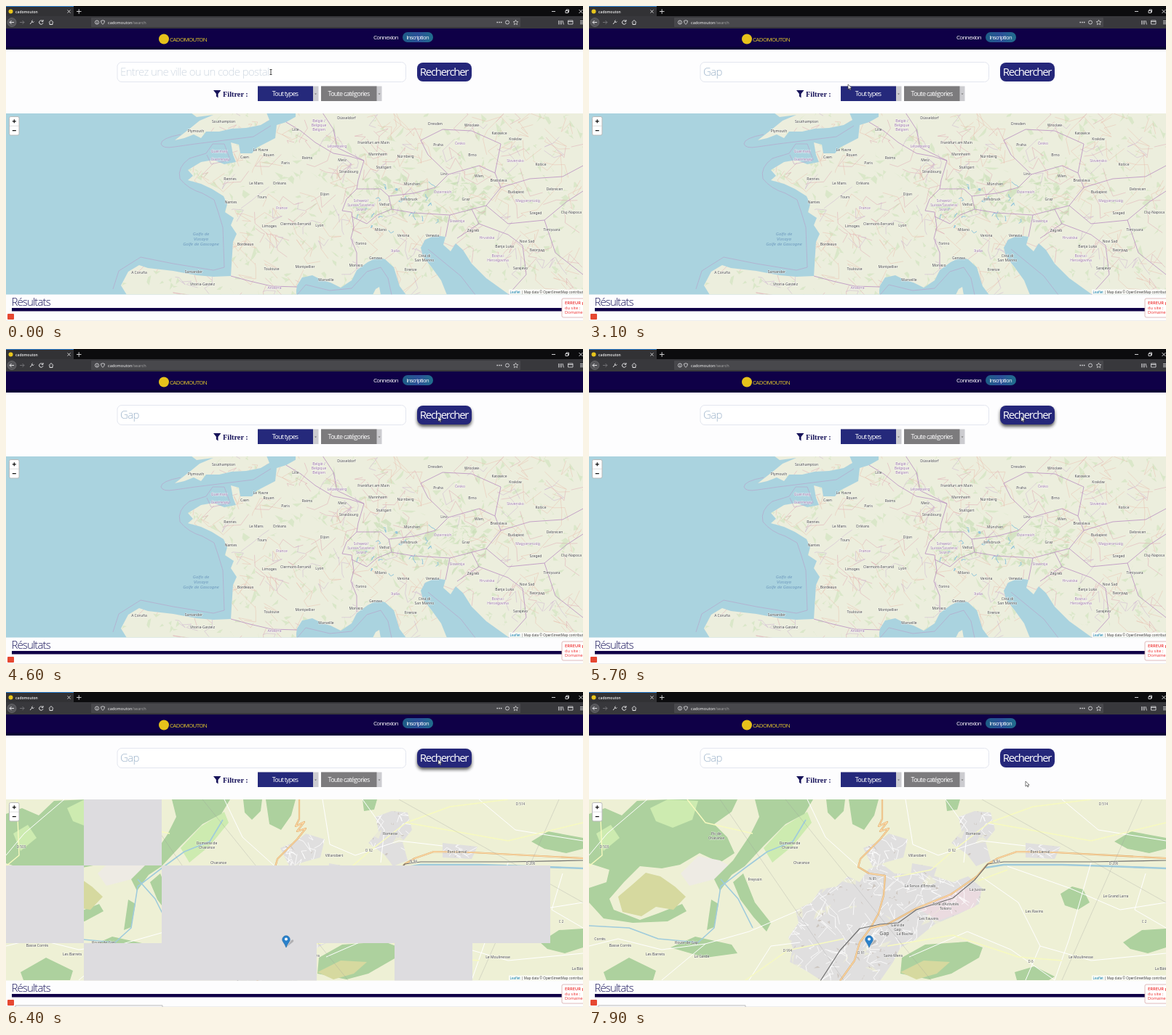
An HTML page that plays this animation: 793x434 px, repeating every 8 s.

```html
<!DOCTYPE html>
<html lang="fr">
<head>
<meta charset="utf-8">
<style>
html, body { margin: 0; width: 100%; height: 100%; overflow: hidden; background: #fff; }
svg { display: block; width: 100vw; height: 100vh; }
text { font-family: "Open Sans", sans-serif; white-space: pre; }
.ui { letter-spacing: -.085em; }
.light { font-weight: 300; letter-spacing: -.06em; }
.mid { text-anchor: middle; }
.line { fill: none; stroke: #e4e4e6; stroke-width: 1; }
.map text { font: 5px "Noto Sans", sans-serif; text-anchor: middle; fill: #444; paint-order: stroke; stroke: #fffb; stroke-width: .9px; }
.map .country { fill: #9a72a8; }
.map .sea { font: italic 6px "Noto Sans", sans-serif; fill: #6d98bd; stroke: none; }
.map .sign { font-size: 4.6px; fill: #555; }
.map path { fill: none; stroke-linejoin: round; }
.map .land { fill: #eceedd; }
.border { stroke: #b98fc0; stroke-width: .8; }
.map .wood { fill: #add19e; }
.map .grass { fill: #cdebb0; }
.map .heath { fill: #d6d99f; }
.map .rock { fill: #eeebe4; }
.map .built { fill: #e0dfdf; }
.map .works { fill: #ebdbe0; }
.lane { stroke: #fff; stroke-width: 1; }
.minor { stroke: #f7fabf; stroke-width: 1.4; }
.casing { stroke: #d2a05c; stroke-width: 2.2; }
.main { stroke: #fcd6a4; stroke-width: 1.4; }
.river { stroke: #9fcbdc; stroke-width: 1.6; }
.rail { stroke: #707070; stroke-width: 1.2; }
.power { stroke: #999; stroke-width: .3; }
</style>
</head>
<body>
<svg viewBox="0 0 793 434" preserveAspectRatio="none">
  <defs>
    <clipPath id="view"><rect y="148" width="793" height="249.500"/></clipPath>
    <clipPath id="coast"><use href="#britain"/><use href="#west"/><use href="#east"/></clipPath>
    <clipPath id="streets"><use href="#city"/><use href="#village"/><use href="#hamlet"/></clipPath>
    <linearGradient id="pill"><stop stop-color="#1d5f86"/><stop offset=".5" stop-color="#2b4f98"/><stop offset="1" stop-color="#1f6f8c"/></linearGradient>
    <filter id="blur" x="-20%" y="-40%" width="140%" height="200%"><feGaussianBlur stdDeviation="2"/></filter>
  </defs>
  <rect width="793" height="434" fill="#fdfdfe"/>

  <!-- browser -->
  <rect width="793" height="15" fill="#0c0c0e"/>
  <rect width="93" height="15" fill="#323235"/>
  <rect width="93" height="1" fill="#2f86d8"/>
  <rect y="14" width="793" height="17" fill="#38383c"/>
  <rect x="117" y="16" width="590" height="13" rx="1" fill="#48484c"/>
  <circle cx="6.500" cy="7.500" r="3" fill="#e8c51c"/>
  <text x="13" y="9.500" font-size="5" font-weight="600" fill="#eee">cadomouton</text>
  <text x="140" y="24.600" font-size="5.600" fill="#fff">cadomouton<tspan fill="#aaa">/search</tspan></text>
  <circle cx="8" cy="22.500" r="6" fill="#555559" stroke="#77777b" stroke-width=".6"/>
  <g class="line">
    <path d="M84.500 5.500l4 4m0-4l-4 4M97 7.500h6.500M100.200 4.300v6.500M750 7.500h5M787.500 5l5 5m0-5l-5 5M769 6.500h3.500v3h-3.500zM770 6v-1h3.500v3.500h-1" stroke-width=".9"/>
    <path d="M11 22.500H5m2.500-2.500l-2.500 2.500 2.500 2.500M33 25l3.500-4m0-1.500a1.500 1.500 0 1 0 2 2M50.500 21a2.700 2.700 0 1 0 .4 2.200M51 19v2.300h-2.300M59 22.500l3-3 3 3M60 22.500v3h4v-3"/>
    <path d="M19 22.500h6m-2.500-2.500l2.500 2.500-2.500 2.500" stroke="#707074"/>
    <circle cx="125" cy="22.500" r="2.600" stroke-width=".8"/><path d="M125 22v2.200M125 20.700v.6" stroke-width=".8"/>
    <path d="M130.500 20.500l2.500-.8 2.500.8q0 3.500-2.500 4.800-2.500-1.300-2.500-4.800z" stroke-width=".8"/>
    <path d="M674.500 22.500h7" stroke-width="1.500" stroke-dasharray="1.500 1.200"/>
    <circle cx="689" cy="22.500" r="2.500" stroke-width=".8"/>
    <path d="M700.500 19.200l1 2.200 2.300.3-1.700 1.600.5 2.400-2.100-1.200-2.100 1.200.5-2.400-1.700-1.600 2.300-.3z" stroke-width=".7"/>
    <path d="M759.500 20v5.500M761.500 20v5.500M763.500 20v5.500M765 20l1.500 5.500M772.500 20h6.500v5h-6.500zM772.500 21.500h6.500M789 20.500h5m-5 2h5m-5 2h5" stroke-width=".8"/>
  </g>

  <!-- page header -->
  <rect y="31" width="793" height="29" fill="#0f0047"/>
  <rect y="56" width="793" height="4" fill="#080036"/>
  <circle cx="217" cy="45.500" r="7" fill="#e6c21b"/>
  <text class="ui" x="225" y="48.500" font-size="8" fill="#e3c92c">CADOMOUTON</text>
  <text class="ui" x="505" y="45.500" font-size="8" fill="#fff">Connexion</text>
  <rect x="545" y="36" width="42" height="14" rx="7" fill="url(#pill)"/>
  <text class="ui mid" x="565.700" y="45.500" font-size="7.700" fill="#fff">Inscription</text>

  <!-- search form -->
  <rect x="153" y="77.500" width="396.500" height="27" rx="6" fill="#fff" stroke="#e3e6ef"/>
  <text id="query" class="light" x="157" y="96" font-size="15" style="letter-spacing:-.043em"></text>
  <rect id="shadow" x="565" y="81" width="75" height="26" rx="8" fill="#222" filter="url(#blur)"/>
  <rect x="565" y="78" width="75" height="26" rx="8" fill="#25277a"/>
  <text class="ui mid" x="602" y="96" font-size="15" fill="#fff">Rechercher</text>
  <path d="M285 116h10.500l-4 5v5.500l-2.600-2v-3.500z" fill="#17135a"/>
  <text x="298" y="125" font-size="10.300" fill="#17135a" style="font-family:'Liberation Serif',serif;font-weight:700">Filtrer :</text>
  <rect x="346" y="110.500" width="83.500" height="20.500" fill="#ccccd0"/>
  <rect x="346" y="110.500" width="76" height="20.500" fill="#25297b"/>
  <rect x="433" y="110.500" width="83.500" height="20.500" fill="#ccccd0"/>
  <rect x="433" y="110.500" width="76.500" height="20.500" fill="#7c7b7d"/>
  <path d="M424 120.500h3l-1.500 1.700zM511.500 120.500h3l-1.500 1.700z" fill="#777"/>
  <text class="ui mid" x="383.500" y="124" font-size="9" fill="#fff">Tout types</text>
  <text class="ui mid" x="471" y="124" font-size="9" fill="#fff">Toute catégories</text>

  <!-- map -->
  <g clip-path="url(#view)">
    <g id="europe" class="map">
      <rect y="148" width="793" height="250" fill="#aad3df"/>
      <path id="britain" class="land" d="M254 147L262 153 285 150 266 158 255 167 232 185 245 182 258 177 268 182 275 173 293 173 310 169 330 168 350 164 362 157 358 147Z"/>
      <path id="west" class="land" d="M408 147L385 160 372 164 370 182 345 195 338 203 322 203 320 191 309 188 312 205 316 215 300 218 285 212 268 215 250 226 257 234 250 240 268 245 283 252 299 262 304 273 301 284 313 292 309 302 317 314 312 325 309 372 285 373 262 371 230 365 195 361 183 357 168 366 158 385 166 398H399V147Z"/>
      <path id="east" class="land" d="M398 147V398L400 385 407 374 421 371 435 378 446 381 460 388 475 378 482 364 497 353 511 346 521 349 533 360 537 373 541 386 550 398H606L598 378 585 360 573 345 570 333 576 322 590 316 604 318 601 329 611 338 618 327 628 336 640 355 660 375 692 398H794V147Z"/>
      <path class="land" d="M504 398l4-8 5-3 2 11z"/>
      <g id="terrain" clip-path="url(#coast)"></g>
      <path class="border" d="M385 160L405 172 425 188 450 203 472 207 492 213 484 240 482 252 468 266 462 282 475 284 478 305 474 320 482 340 482 362M309 372L335 379 365 386 400 387M482 252L515 252 526 262 530 280 510 288 496 300 475 290M526 262L560 258 590 250 608 232 650 220 672 230 680 250 660 275 640 280 610 288 560 285 530 280M610 288L604 318M640 280L650 300 620 320M492 213L455 195 450 170 435 147M608 232L580 205 570 185 600 170 640 172 680 190 672 230M680 250L720 238 765 235 793 220M660 275L690 300 740 295 770 270 793 255M650 300L690 315 710 330 715 370 690 398M740 295L755 340 793 370"/>
      <path class="border" stroke-opacity=".6" d="M240 177Q213 182 213 190 215 197 232 194L260 190 300 185 340 180 364 165M252 210Q235 222 239 238 250 252 270 258L286 267 292 285 298 305 300 360 285 364 230 355 185 346 155 365 147 390M252 210L275 203 284 190 300 190 308 212 282 218 276 205M400 398L412 384 445 392 475 389 496 366 515 360 525 375 530 398M580 335L625 372 645 398"/>
    </g>
    <g id="town" class="map">
      <rect y="148" width="793" height="250" fill="#eef0d5"/>
      <path class="wood" d="M0 168L22 160 45 170 66 150 110 148H204L196 165 172 182 190 200 200 222 180 235 152 222 125 238 100 243 70 240 48 262 28 285 34 300 70 314 95 305 128 292 134 302 108 316 60 318 20 312 0 290V270L24 262 28 245 0 236Z"/>
      <path class="grass" d="M84 160L108 148 150 150 142 176 115 187 92 178ZM240 215L268 185 300 165 306 180 280 212 252 235ZM10 195l20-12 12 18-22 18z"/>
      <path class="heath" d="M40 282L60 265 78 249 98 254 118 268 133 282 116 300 92 296 72 309 46 303Z"/>
      <path class="rock" d="M126 250L150 226 180 232 194 240 172 258 138 267Z"/>
      <path class="wood" d="M228 148H308L296 168 270 182 240 212 214 240 196 252 180 274 172 258 198 232 222 196 234 172ZM326 148H352L350 164 338 176 328 166ZM357 148H398L392 170 378 190 362 182ZM198 262L212 250 228 290 250 318 244 330 226 310 208 286ZM168 286l10 6-6 32-10 4zM20 386L55 366 92 384 88 397H24ZM112 352L146 337 196 348 204 360 160 366Z"/>
      <path class="wood" d="M430 366L462 348 520 344 541 352 536 366 498 388 468 396 428 388ZM490 148h20l-4 14-14 2zM722 206L745 192 793 201V216L770 222 740 216ZM648 278L664 268 679 272 688 290 672 300 654 294ZM734 345L760 328 793 326V352L768 360 744 354ZM585 386L612 378 640 392 632 397H588ZM332 318L350 304 366 312 368 328 350 340 334 334Z"/>
      <path class="heath" d="M428 386L460 370 496 372 478 388 450 396Z"/>
      <path id="city" class="built" d="M320 398L300 385 276 372 280 352 274 338 288 318 284 300 306 290 318 272 340 268 356 254 372 262 384 244 403 237 420 250 470 252 500 262 521 254 540 270 536 292 508 306 475 320 448 342 428 352 418 372 400 398Z"/>
      <path id="village" class="built" d="M508 172L530 164 552 166 558 190 545 206 552 232 532 240 520 224 498 208 512 192Z"/>
      <path id="hamlet" class="built" d="M377 215L398 206 412 195 438 203 432 228 410 234 390 241ZM600 208L648 213 640 230 600 228ZM444 236l34 6-6 18-30-6z"/>
      <path class="works" d="M455 300L478 286 510 270 540 272 530 296 505 306 480 315Z"/>
      <g id="alleys" clip-path="url(#streets)"></g>
      <path class="river" d="M298 176L280 206 245 220 215 242 181 268 172 325 150 345 95 340 55 325 0 322M181 258L205 285 225 325"/>
      <path class="river" style="stroke-width:2.600" d="M545 242L570 238 650 238 715 240 793 243"/>
      <path class="lane" d="M0 350L40 340 100 355 160 347 220 330 290 300M300 148L325 200 375 245M435 148L445 210 480 225 540 205 600 212M490 148L520 190 515 235M0 225L25 195 80 148M540 255L590 290 620 350 600 397M620 350L690 370 793 360M575 240L660 270 730 300 793 290M690 235L660 340 640 397M440 365L520 330 580 355 640 397M100 397L160 347M220 397L250 350 290 345M650 148L700 190 793 205M765 250L750 300 793 325"/>
      <path class="minor" d="M0 240L18 225 15 148M135 148L160 180 225 195M215 397L273 356 350 340M420 255L470 245 500 219 550 180 610 158 690 148M550 180L690 205 793 180M535 260L575 245M410 350L440 345 500 335 590 365 650 370"/>
      <g id="highways"></g>
      <path class="rail" d="M318 398L345 356 372 326 400 320 425 318 450 300 500 284 530 259 548 237 570 234 690 234 793 232"/>
      <path class="power" d="M180 148L350 397M540 148L793 290M270 148L470 397M650 397L760 148"/>
    </g>
    <g id="tiles" shape-rendering="crispEdges" fill="#dddcdf"></g>
    <g id="marker">
      <path d="M386 351l6-9q4-2 3 2z" fill="#0003"/>
      <path d="M385 352q-1.500-4-4-7.500a5.300 5.300 0 1 1 8 0q-2.500 3.500-4 7.500z" fill="#2a81cb" stroke="#236aa3" stroke-width=".6"/>
      <circle cx="385" cy="340.500" r="2" fill="#fff"/>
    </g>
    <rect x="691" y="390.500" width="102" height="7" fill="#fffc"/>
    <text x="692.500" y="395.700" font-size="4.600" fill="#333"><tspan fill="#0078a8">Leaflet</tspan> | Map data © OpenStreetMap contributors</text>
  </g>
  <rect x="4.500" y="152.500" width="13.500" height="25.500" rx="2" fill="#fff" stroke="#b9b9b9"/>
  <path d="M5 165.200h13" stroke="#ccc" stroke-width=".6"/>
  <path d="M8.800 158.800h5m-2.500-2.500v5M8.800 171.600h5" stroke="#111" stroke-width="1.200"/>

  <!-- results -->
  <text class="light" x="7.500" y="413" font-size="15" fill="#17135a">Résultats</text>
  <rect x="8" y="416" width="785" height="4.500" fill="#0f0047"/>
  <rect x="764" y="403" width="40" height="26" rx="2" fill="#fff" stroke="#d8a9a9" stroke-width=".8"/>
  <g font-size="5.800" fill="#ee2b2b"><text x="768" y="411" font-weight="600">ERREUR p</text><text x="768" y="417.600">du site :</text><text x="768" y="424.200">Domaine</text></g>
  <rect x="2" y="424" width="9" height="8" rx="1" fill="#e64832"/>
  <path d="M0 433.600h793" stroke="#ddd" stroke-width=".6"/>
  <path id="status" d="M13 434v-2.200h202v2.200" fill="#f4f4f5" stroke="#aaa" stroke-width=".7"/>

  <g id="pointer">
    <path id="beam" d="M-1.500-3.500h3M0-3.500v7M-1.500 3.500h3" stroke="#333" stroke-width=".9"/>
    <path id="arrow" d="M0 0v7l1.700-1.500 1.200 2.400 1.100-.5-1.100-2.300h2.300z" fill="#fff" stroke="#222" stroke-width=".6"/>
  </g>
</svg>
<script>
const $ = id => document.getElementById(id);
const clamp = (v, lo = 0, hi = 1) => Math.min(hi, Math.max(lo, v));

function random(seed) {
  return () => (seed = seed * 16807 % 2147483647) / 2147483647;
}
const add = (id, markup) => $(id).insertAdjacentHTML('beforeend', markup);

// Each label reads "name x y".
function labels(id, kind, list) {
  add(id, list.split(', ').map(item => {
    const [, name, x, y] = item.match(/(.+) (\d+) (\d+)$/);
    return `<text class="${kind}" x="${x}" y="${+y + 1.700}">${name}</text>`;
  }).join(''));
}

function scribble(rnd, count, box, reach, style) {
  const [x, y, w, h] = box;
  const step = () => ((rnd() - .5) * reach).toFixed(1);
  let d = '';
  for (let i = 0; i < count; i++) {
    d += `M${(x + rnd() * w).toFixed(1)} ${(y + rnd() * h).toFixed(1)}`;
    for (let k = 0; k < 3; k++) d += `l${step()} ${step()}`;
  }
  return `<path d="${d}" ${style}/>`;
}

const rnd = random(77);
const mapBox = [150, 148, 643, 250];
const cityBox = [265, 160, 390, 238];
add('terrain',
  scribble(rnd, 420, mapBox, 16, 'style="fill:#cfe3bd" opacity=".6"') +
  scribble(rnd, 110, [470, 235, 190, 65], 17, 'style="fill:#c5dcb2" opacity=".6"') +
  scribble(rnd, 150, mapBox, 44, 'stroke="#e7bfae" stroke-width=".5"') +
  scribble(rnd, 80, mapBox, 40, 'stroke="#dc9fac" stroke-width=".45"') +
  scribble(rnd, 60, mapBox, 32, 'stroke="#c8aacd" stroke-width=".45"') +
  scribble(rnd, 20, [470, 240, 130, 70], 9, 'stroke="#8fc4da" stroke-width="1"'));
add('alleys',
  scribble(rnd, 60, cityBox, 26, 'style="fill:#eef0d5" opacity=".7"') +
  scribble(rnd, 300, cityBox, 30, 'stroke="#fff" stroke-width=".8"') +
  scribble(rnd, 260, cityBox, 7, 'style="fill:#cdc6c0"'));

const highways = 'M403 148V175L398 185 410 179 400 192 412 188 400 203 373 230 370 241 385 250 407 253 405 280 398 305 387 325 372 345 365 370 345 398M387 325L410 320 450 298 497 279 533 254 548 237 562 229 588 220 640 221 793 229';
add('highways', `<path class="casing" d="${highways}"/><path class="main" d="${highways}"/>`);

labels('europe', '', 'Düsseldorf 468 154, Southampton 299 159, Plymouth 261 172, Lille 398 170, Le Havre 350 198, Rouen 361 205, Caen 328 208, Paris 384 216, Reims 414 209, Metz 462 212, Frankfurt am Main 505 188, Mannheim 511 204, Nürnberg 549 207, Dresden 590 162, Praha 594 191, Brno 641 205, Wrocław 640 164, Katowice 678 175, Kraków 700 183, Rennes 308 238, Le Mans 344 244, Orléans 376 244, Strasbourg 471 228, Stuttgart 519 222, München 558 245, Linz 602 231, Wien 650 234, Bratislava 677 240, Budapest 701 256, Košice 735 218, Debrecen 754 252');
labels('europe', '', 'Nantes 309 270, Tours 352 263, Dijon 438 259, Vaduz 520 273, Innsbruck 554 266, Graz 632 266, Limoges 362 303, Clermont-Ferrand 398 300, Lyon 431 302, Milano 515 308, Torino 488 327, Verona 546 316, Venezia 586 316, Zagreb 642 309, Bordeaux 329 328, Toulouse 365 362, Montpellier 411 359, Marseille 440 377, Monaco 481 357, Genova 508 347, Città di 575 344, San Marino 575 350, Firenze 556 363, A Coruña 183 367, Santander 258 366, Vitoria-Gasteiz 270 383, Banja Luka 685 331, Novi Sad 716 324, Београд 730 336, Sarajevo 707 361, Timișoara 750 308, Cluj-Napoca 777 284, Szeged 728 285');
labels('europe', 'country', 'België / 430 158, Belgique 430 164, Belgien 430 170, Lëtzebuerg 455 193, Guernsey 293 200, Guernesey 294 211, Česko 624 189, France 379 278, Schweiz/ 488 268, Suisse/Svizzera/ 488 274, Svizra 488 280, Österreich 600 256, Magyarország 717 268, Slovensko 700 213, Slovenija 620 296, Hrvatska 661 319, Bosna i 676 344, Hercegovina 676 350, Andorra 369 388, Italia 535 337');
labels('europe', 'sea', 'Golfo de 268 314, Vizcaya 268 321, Golfe de Gascogne 268 328');

labels('town', '', 'Pic de 175 195, Charance 175 201, Domaine de 276 208, Charance 276 214, Charance 292 235, Romette 528 195, Villarobert 451 225, Freyssin 228 258, La Fence d’Entraib 455 267, La Justice 534 272, Zone d’Activités 490 292, Tokoro 490 298, Les Fauvins 467 312, Gare de 424 321, Gap 424 327, La Blache 434 333, Saint-Mens 418 363, Corrès 15 340, Basse Corrès 43 349, Les Barrets 91 361, La Garde 155 364, Route de Gap 134 345, Le Grand Larra 724 281, Les Ravins 612 302, Le Moulinesse 676 365, Pont Lernal 620 220, La Bâtie 787 381');
labels('town', 'sign', 'D 503 21 213, D 514 707 154, D 206 721 236, D 92 499 218, N 94 560 233, N 85 390 257, D 994 273 356, D 91 374 359, C 2 763 316, D 6 607 371');
add('town', '<text x="406" y="335" style="font-size:7px">Gap</text>');

// Arrival time of every map tile, by row.
const arrivals = [
  [6200, 6600, 6200, 6200, 6200, 6200, 6200, 6200],
  [6700, 6200, 6600, 6985, 7100, 6700, 6600, 6200],
  [6200, 6700, 7200, 7300, 6200, 6800, 6200, 6200]
];
const rowEdges = [148, 239, 346, 398], tileWidth = 106.800;
const covers = arrivals.flatMap((row, r) => row.map((time, c) => {
  const x = Math.round(c * tileWidth), width = Math.round((c + 1) * tileWidth) - x;
  add('tiles', `<rect x="${x}" y="${rowEdges[r]}" width="${width}" height="${rowEdges[r + 1] - rowEdges[r]}"/>`);
  return { time, node: $('tiles').lastElementChild };
}));

const path = [[0, 364, 91], [1900, 364, 91], [3100, 356, 108], [3300, 356, 108], [4500, 594, 93],
  [6600, 594, 93], [7000, 596, 99], [7900, 600, 123], [8000, 600, 123]];

function pointerAt(t) {
  const i = path.findIndex((p, k) => k && t <= p[0]);
  const [t0, x0, y0] = path[i - 1], [t1, x1, y1] = path[i];
  const u = (t - t0) / (t1 - t0), e = u * u * (3 - 2 * u);
  return [x0 + (x1 - x0) * e, y0 + (y1 - y0) * e];
}

const show = (id, on) => $(id).setAttribute('visibility', on ? 'visible' : 'hidden');

function draw(t) {
  const typed = 'Gap'.slice(0, [1300, 1600, 1900].filter(key => t >= key).length);
  $('query').textContent = typed || 'Entrez une ville ou un code postal';
  $('query').setAttribute('fill', typed ? '#9db4cb' : '#cfd8e2');

  const [x, y] = pointerAt(t);
  const inField = x > 153 && x < 550 && y > 77 && y < 105;
  $('pointer').setAttribute('transform', `translate(${x} ${y})`);
  show('beam', inField);
  show('arrow', !inField);
  $('shadow').setAttribute('opacity', .75 * clamp((x - 565) / 15) * clamp((106 - y) / 4));

  show('europe', t < 5900);
  show('town', t >= 5900);
  show('tiles', t >= 5900);
  show('marker', t >= 6200);
  show('status', t >= 6200);
  for (const { time, node } of covers) node.setAttribute('opacity', 1 - clamp((t - time) / 200));
}

function tick() {
  draw(performance.now() % 8000);
  requestAnimationFrame(tick);
}
tick();
</script>
</body>
</html>
```
